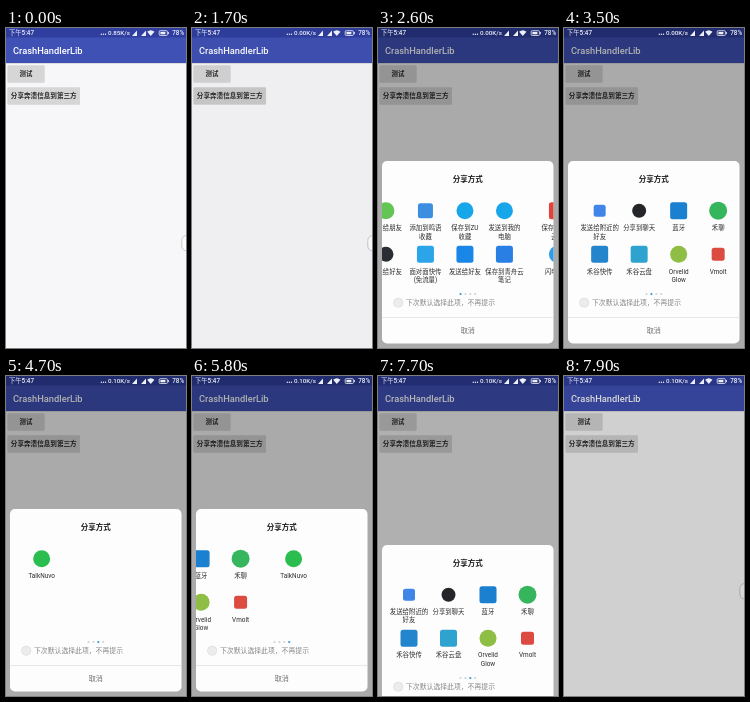
Recreate the animation shown at these times as an HTML page with a canvas. Size 180 by 320 pixels, loop 8000 ms.

```html
<!DOCTYPE html>
<html lang="zh-CN">
<head>
<meta charset="utf-8">
<title>CrashHandlerLib</title>
<style>
html, body { margin: 0; width: 100%; height: 100%; overflow: hidden; background: #f7f6f8; }
canvas { display: block; width: 180px; height: 320px; }
</style>
</head>
<body>
<canvas id="stage"></canvas>
<script>
const W = 180, H = 320, LOOP = 8000, STEP = 100;
const CJK = '"Noto Sans CJK SC", "Noto Sans CJK", sans-serif';
const LATIN = 'Roboto, "Noto Sans CJK SC", "Noto Sans CJK", sans-serif';
const SHEET = { x: 4, y: 133, w: 171.5, h: 182.5 };
const SHEET_TRAVEL = H - SHEET.y;
const MAX_DIM = .31;

const canvas = document.getElementById('stage');
const ctx = canvas.getContext('2d');
const ratio = window.devicePixelRatio || 1;
canvas.width = W * ratio;
canvas.height = H * ratio;

const round = (label, color, size = 17) => ({ label, color, size, radius: size / 2 });
const square = (label, color, size = 17) => ({ label, color, size, radius: 2.5 });

const PAGES = [
  [
    round('发送给朋友', '#62c554'),
    square('添加到鸣语|收藏', '#3c8fe0', 15),
    round('保存到ZU|收藏', '#17a6ea'),
    round('发送到我的|电脑', '#17a6ea'),
    round('发送给好友', '#2a2d33', 15),
    square('面对面快传|(免流量)', '#2ba4ea'),
    square('发送给好友', '#1a86e8'),
    square('保存到青舟云|笔记', '#2a7fe4')
  ], [
    square('保存到星禾|云盘', '#e04338'),
    square('导入到笔记', '#f2b740'),
    round('打印', '#3b8fd6'),
    square('便签', '#f0c04c'),
    round('闪电互传', '#2f9be8'),
    square('邮件', '#3b8fd6'),
    square('信息', '#55bd63'),
    round('我的收藏', '#ee7b45')
  ], [
    square('发送给附近的|好友', '#4285e8', 12),
    round('分享到聊天', '#24262a', 14),
    square('蓝牙', '#1b80d0'),
    round('禾聊', '#35b65c', 18),
    square('禾谷快传', '#2385cc'),
    square('禾谷云盘', '#2fa3d0'),
    round('Orvelid|Glow', '#8fbe45'),
    square('Vmolt', '#dc4b41', 13)
  ],
  [round('TalkNuvo', '#2bbd4e')]
];

const SWIPES = [
  { start: 2500, length: 500, page: 1 },
  { start: 3100, length: 600, page: 2 },
  { start: 4300, length: 600, page: 3 },
  { start: 5600, length: 600, page: 2 }
];

const progress = (t, start, length) => Math.min(1, Math.max(0, (t - start) / length));
const smooth = u => u * u * (3 - 2 * u);
const easeOut = u => 1 - (1 - u) ** 3;
// Short finger drag followed by a strong settle
const swipeEase = u => 1 - (1 - u ** 2.5) ** 8;

function pager(t) {
  let scroll = 0, settled = 0;
  for (const { start, length, page } of SWIPES) {
    const u = progress(t, start, length);
    scroll += (page - scroll) * swipeEase(u);
    if (u === 1) settled = page;
  }
  return { scroll, settled };
}

const dimAt = t =>
  MAX_DIM * (smooth(progress(t, 1600, 500)) - smooth(progress(t, 7600, 600)));

const openAt = t =>
  easeOut(progress(t, 1700, 400)) - progress(t, 7600, 300) ** 1.5;

function text(str, x, y, size, color, { align = 'center', weight = 400, font = CJK } = {}) {
  ctx.font = `${weight} ${size}px ${font}`;
  ctx.textAlign = align;
  ctx.textBaseline = 'alphabetic';
  ctx.fillStyle = color;
  ctx.fillText(str, x, y + size * .36);
}

function rect(x, y, w, h, color) {
  ctx.fillStyle = color;
  ctx.fillRect(x, y, w, h);
}

function roundPath(x, y, w, h, r) {
  ctx.beginPath();
  ctx.roundRect(x, y, w, h, r);
}

function roundBox(x, y, w, h, r, color) {
  roundPath(x, y, w, h, r);
  ctx.fillStyle = color;
  ctx.fill();
}

const disc = (x, y, r, color) => roundBox(x - r, y - r, r * 2, r * 2, r, color);

function polygon(points, color) {
  ctx.beginPath();
  points.forEach(([x, y]) => ctx.lineTo(x, y));
  ctx.closePath();
  ctx.fillStyle = color;
  ctx.fill();
}

function wifi(x, y, color) {
  ctx.beginPath();
  ctx.moveTo(x, y);
  ctx.arc(x, y, 5.5, -Math.PI * .73, -Math.PI * .27);
  ctx.fillStyle = color;
  ctx.fill();
}

function battery(x, y, color) {
  ctx.strokeStyle = color;
  ctx.lineWidth = .8;
  roundPath(x, y, 8.2, 4.8, 1);
  ctx.stroke();
  rect(x + 1.2, y + 1.2, 5, 2.4, color);
  rect(x + 9, y + 1.3, .8, 2.2, color);
}

// Status content stays bright while the window behind is dimmed
function status(t) {
  const white = '#eceef8';
  const style = { font: LATIN, weight: 500 };
  text('下午5:47', 3, 5, 6.3, white, { ...style, align: 'left' });
  for (let i = 0; i < 3; i++) disc(95.3 + i * 2.1, 6.2, .7, white);
  const rate = t < 700 ? '0.85' : t < 4100 ? '0.00' : '0.10';
  text(rate + 'K/s', 102, 5, 6.2, white, { ...style, align: 'left' });
  for (const x of [126, 135]) polygon([[x, 8], [x + 5, 8], [x + 5, 2.5]], white);
  wifi(144.8, 8, white);
  battery(153.2, 2.7, white);
  text('78%', 178, 5, 6.3, white, { ...style, align: 'right' });
}

function button(label, y, w, size, color) {
  roundBox(1.5, y + .7, w, 17, 1, 'rgba(0,0,0,.1)');
  roundBox(1.5, y, w, 17, 1, color);
  text(label, 1.5 + w / 2, y + 8.8, size, '#2b2b2b', { weight: 600 });
}

function handle(opacity) {
  ctx.globalAlpha = opacity;
  roundBox(175.8, 207.5, 10, 15.5, 5, '#fff');
  ctx.strokeStyle = '#c9c9cb';
  ctx.lineWidth = 1;
  ctx.stroke();
  ctx.globalAlpha = 1;
}

function app(t, open) {
  rect(0, 0, W, H, '#f7f6f8');
  rect(0, 35, W, 1, 'rgba(0,0,0,.1)');
  rect(0, 0, W, 35, '#3f51b5');
  rect(0, 0, W, 9.5, '#303f9f');
  text('CrashHandlerLib', 7, 22.5, 9.3, '#fff', { align: 'left', weight: 500, font: LATIN });
  const pressed = t >= 1300 && t < 2100;
  button('测试', 37.2, 37, 6.4, '#d6d6d7');
  button('分享奔溃信息到第三方', 59.2, 72.5, 6.6, pressed ? '#cbcbcc' : '#d6d6d7');
  handle(1 - open);
}

function target({ label, color, size, radius }, x, y) {
  roundBox(x - size / 2, y - size / 2, size, size, radius, color);
  label.split('|').forEach((line, i) =>
    text(line, x, y + 17 + i * 8.5, 6.4, '#2c2c2c', { font: LATIN }));
}

function pages(scroll) {
  PAGES.forEach((page, p) => {
    const shift = (p - scroll) * SHEET.w;
    page.forEach((item, i) =>
      target(item, 31 + (i % 4) * 39.5 + shift, 182.7 + Math.floor(i / 4) * 43.5));
  });
}

function sheet(t, open) {
  if (open <= 0) return;
  const { x, y, w, h } = SHEET, mid = x + w / 2;
  const { scroll, settled } = pager(t);
  ctx.save();
  ctx.translate(0, (1 - open) * SHEET_TRAVEL);
  roundBox(x, y, w, h, 5, '#fdfdfd');
  ctx.clip();
  text('分享方式', mid, 151.5, 7.5, '#1c1c1c', { weight: 600 });
  pages(scroll);
  PAGES.forEach((_, i) =>
    disc(82.5 + i * 4.9, 266, 1.1, i === settled ? '#2f95dc' : '#cfd3d6'));
  disc(20.2, 274.8, 5, '#dedede');
  disc(20.2, 274.8, 4.3, '#ececec');
  text('下次默认选择此项，不再提示', 28, 274.8, 6.85, '#858585', { align: 'left' });
  rect(x, 289.3, w, .7, '#dedede');
  text('取消', mid, 302.3, 7.1, '#707070');
  ctx.restore();
}

function draw(time) {
  const t = Math.floor(time % LOOP / STEP) * STEP;
  const open = openAt(t);
  ctx.setTransform(ratio, 0, 0, ratio, 0, 0);
  app(t, open);
  rect(0, 0, W, H, `rgba(0,0,0,${dimAt(t)})`);
  status(t);
  sheet(t, open);
}

const start = performance.now();
function tick() {
  draw(performance.now() - start);
  requestAnimationFrame(tick);
}
tick();
</script>
</body>
</html>
```
